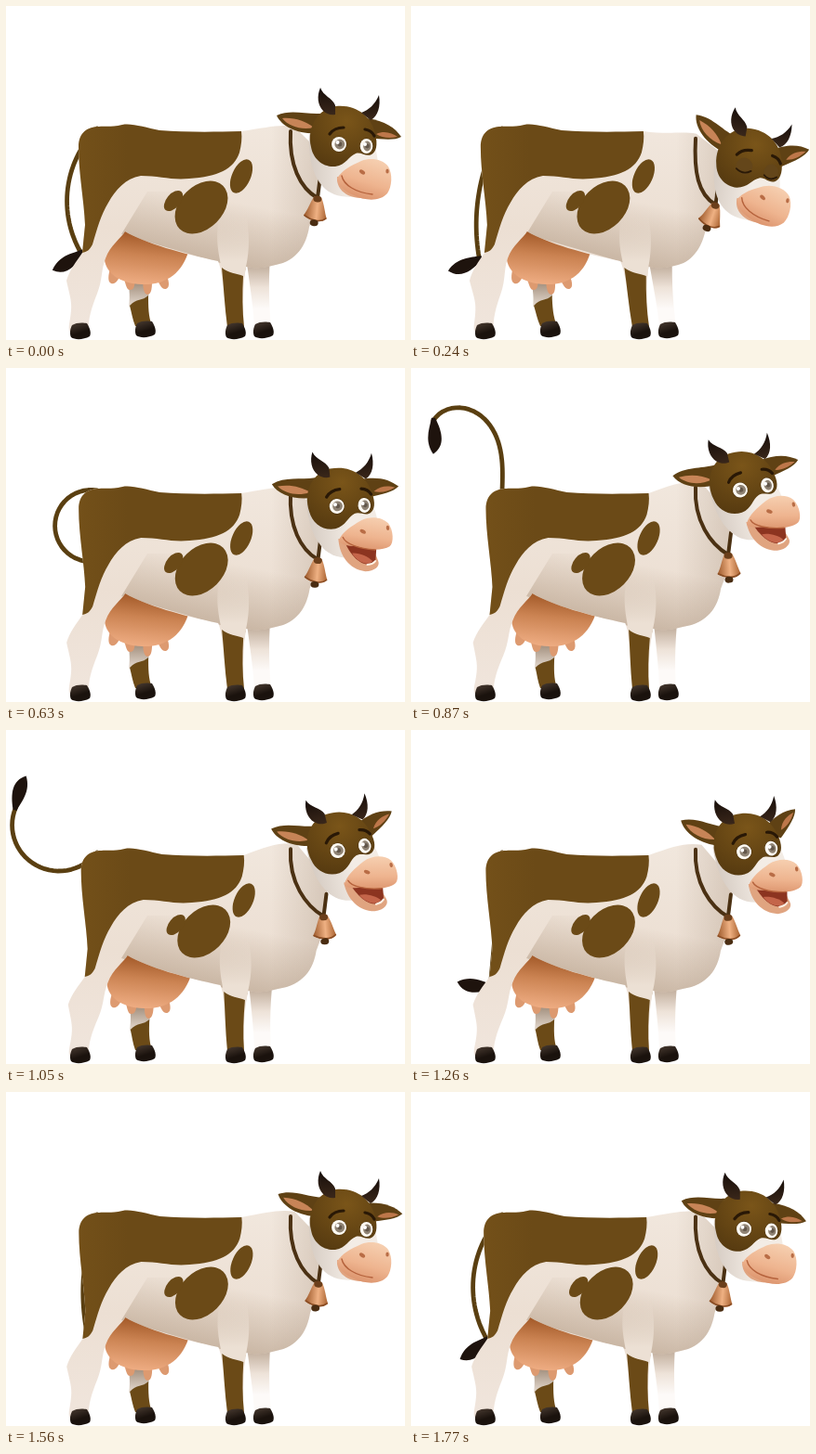
These frames come from a looping animation (429x360 px, 1800 ms). An HTML page:

```html
<!DOCTYPE html>
<html lang="en">
<head>
<meta charset="utf-8">
<title>Cow</title>
<style>
html, body { margin: 0; width: 100%; height: 100%; overflow: hidden; background: #fff; }
svg { display: block; width: 100vw; height: 100vh; }
.brown { fill: #6b4a17; }
.dark { fill: #1e130d; }
.line { fill: none; stroke-linecap: round; stroke-linejoin: round; }
</style>
</head>
<body>
<svg viewBox="0 0 429 360">
  <defs>
    <linearGradient id="coat" x1="0" y1="0" x2="0" y2="1">
      <stop offset="0" stop-color="#f1e7dd"/><stop offset=".5" stop-color="#ecdfd3"/><stop offset="1" stop-color="#f0e5dc"/>
    </linearGradient>
    <linearGradient id="belly" gradientUnits="userSpaceOnUse" x1="215" y1="205" x2="200" y2="278">
      <stop offset="0" stop-color="#a48a70" stop-opacity="0"/><stop offset="1" stop-color="#a48a70" stop-opacity=".55"/>
    </linearGradient>
    <linearGradient id="throat" gradientUnits="userSpaceOnUse" x1="285" y1="0" x2="338" y2="0">
      <stop offset="0" stop-color="#a08a75" stop-opacity="0"/><stop offset="1" stop-color="#a08a75" stop-opacity=".28"/>
    </linearGradient>
    <linearGradient id="foreleg" gradientUnits="userSpaceOnUse" x1="0" y1="225" x2="0" y2="275">
      <stop offset="0" stop-color="#ece0d4" stop-opacity="0"/><stop offset="1" stop-color="#ece0d4"/>
    </linearGradient>
    <linearGradient id="farleg" x1="0" y1="0" x2="0" y2="1">
      <stop offset="0" stop-color="#b09a86"/><stop offset=".45" stop-color="#eee3d9"/><stop offset=".75" stop-color="#fdfaf8"/>
    </linearGradient>
    <linearGradient id="farthigh" x1="0" y1="0" x2="0" y2="1">
      <stop offset=".2" stop-color="#9a8673"/><stop offset="1" stop-color="#e6dbd1"/>
    </linearGradient>
    <linearGradient id="udder" x1=".6" y1="0" x2=".45" y2="1">
      <stop offset=".15" stop-color="#a55c2b"/><stop offset=".5" stop-color="#cb8352"/><stop offset="1" stop-color="#eeac82"/>
    </linearGradient>
    <linearGradient id="hide" x1="0" y1="0" x2="1" y2="0">
      <stop offset="0" stop-color="#735019"/><stop offset=".3" stop-color="#6b4a17"/>
    </linearGradient>
    <linearGradient id="horn" x1="0" y1="0" x2="0" y2="1">
      <stop offset="0" stop-color="#170e0a"/><stop offset="1" stop-color="#3a271a"/>
    </linearGradient>
    <linearGradient id="nail" x1="0" y1="0" x2=".4" y2="1">
      <stop offset="0" stop-color="#4b3d33"/><stop offset=".7" stop-color="#1a120d"/>
    </linearGradient>
    <radialGradient id="skull" cx=".55" cy=".25" r=".8">
      <stop offset="0" stop-color="#7a5519"/><stop offset="1" stop-color="#563a10"/>
    </radialGradient>
    <linearGradient id="face" x1="0" y1="0" x2="1" y2="0">
      <stop offset="0" stop-color="#d6ccc3"/><stop offset=".6" stop-color="#f3ece5"/>
    </linearGradient>
    <linearGradient id="nose" x1=".7" y1="0" x2=".3" y2="1">
      <stop offset="0" stop-color="#f6cfb0"/><stop offset=".55" stop-color="#eeb48f"/><stop offset="1" stop-color="#d98f68"/>
    </linearGradient>
    <linearGradient id="brass" x1="0" y1="0" x2="1" y2="0">
      <stop offset="0" stop-color="#9a5729"/><stop offset=".55" stop-color="#efb183"/><stop offset="1" stop-color="#a8612f"/>
    </linearGradient>
    <clipPath id="inside"><path class="torso"/></clipPath>
    <path id="hoof" fill="url(#nail)" d="M1,2 C5,-1 13,-1 17,0 C20,5 22,10 20,14 C13,18 4,18 0,15 C-2,11 -1,6 1,2Z"/>
  </defs>

  <path id="tail" class="line" stroke="#5a3f11" stroke-width="4.8"/>
  <path id="tuft" class="dark"/>

  <path class="bend" fill="url(#farleg)" d="M258,270 L284,270 C282,300 283,325 285,345 L267,345 C266,325 262,300 258,270Z"/>
  <path class="bend" fill="url(#farthigh)" d="M130,288 L158,288 C156,298 154,306 153,314 L132,324 C134,312 132,300 130,288Z"/>
  <path class="bend brown" d="M133,323 C140,315 147,318 153,312 C153,324 153,334 157,345 L139,345 C136,338 135,330 133,323Z"/>
  <use href="#hoof" x="140" y="340"/>
  <use href="#hoof" x="267" y="341"/>

  <g fill="#dd9a70">
    <path class="bend" d="M112,283 C110,290 109,297 113,299 C118,301 121,294 124,288Z"/>
    <path class="bend" d="M127,294 C129,301 130,307 134,306 C139,305 138,299 139,294Z"/>
    <path class="bend" d="M147,294 C147,302 148,311 152,311 C157,311 157,302 157,294Z"/>
    <path class="bend" d="M161,292 C165,299 167,306 172,305 C177,303 175,296 172,288Z"/>
  </g>
  <path class="bend" fill="url(#udder)" d="M128,238 C115,250 105,262 106,274 C108,288 122,299 146,300 C172,301 190,288 197,262Z"/>

  <path class="torso" fill="url(#coat)"/>
  <g clip-path="url(#inside)">
    <path fill="url(#belly)" d="M152,200 L340,200 L340,285 L258,285 L124,246Z"/>
    <path fill="url(#throat)" d="M285,120 H345 V285 H285Z"/>
  </g>
  <path class="bend" fill="url(#foreleg)" d="M230,225 C224,250 229,268 232,284 L234,300 L255,300 L258,281 C262,262 262,245 258,225Z"/>
  <path class="bend" fill="url(#hide)" d="M125,128 C112,131 105,129 100,130 C88,130 78,136 78,152 C78,180 84,210 85,236 L82,266 C87,265 90,263 93,257 C98,240 102,225 110,212 C118,198 128,186 145,183 C165,183 178,188 197,186 C228,184 245,176 251,158 C253,150 254,142 253,135 C220,136 190,136 165,134 C150,131 135,126 125,128Z"/>
  <g id="spots" class="brown">
    <ellipse rx="33" ry="23" transform="translate(210 217) rotate(-45)"/>
    <ellipse rx="13" ry="7.5" transform="translate(180 210) rotate(-50)"/>
    <ellipse rx="19.5" ry="10" transform="translate(253 183.5) rotate(-66)"/>
  </g>
  <path class="bend brown" d="M232,282 C239,288 248,288 255,291 C254,310 254,328 256,346 L238,346 C235,324 234,302 232,282Z"/>
  <use href="#hoof" x="70" y="342"/>
  <use href="#hoof" x="237" y="342"/>

  <path id="strap" class="line" stroke="#4b3113" stroke-width="4"/>
  <g id="bell">
    <path fill="url(#brass)" d="M-4,-1 C-8,7 -9,14 -13,20 C-5,26 7,27 12,21 C9,14 8,6 4,-1Z"/>
    <path class="line" stroke="#8a4d24" stroke-width="1.6" d="M-12,20 C-4,25 6,26 11,21"/>
    <ellipse cx="-1" cy="27" rx="4.5" ry="3.4" fill="#4a2d12"/>
    <ellipse cy="1" rx="4.5" ry="3.5" fill="#6b3f1b"/>
  </g>

  <g id="head">
    <g id="earL">
      <path fill="#5f4114" d="M338,116 C322,117 306,111 291,118 C297,131 316,139 338,137Z"/>
      <path fill="#c78457" d="M297,121 C310,120 322,124 331,131 C318,134 304,130 297,121Z"/>
    </g>
    <g id="earR">
      <path fill="#5f4114" d="M388,121 C408,124 418,131 425,141 C418,145 406,144 390,142Z"/>
      <path fill="#bd774a" d="M398,138 C407,134 415,137 421,141 C412,143 404,142 398,138Z"/>
    </g>
    <path fill="url(#face)" d="M326,138 C325,162 329,184 343,197 C351,204 361,206 374,206 L400,175 C400,150 390,130 370,122Z"/>
    <path id="jaw" fill="#e0a480"/>
    <path id="mouth" fill="#8c3420"/>
    <path id="tongue" fill="#c4654a"/>
    <path id="teeth" class="line" stroke="#fff3e6" stroke-width="2"/>
    <path id="muzzle" fill="url(#nose)"/>
    <path id="smile" class="line" stroke="#b5623c" stroke-width="1.4"/>
    <ellipse rx="3.4" ry="2" transform="translate(383 179) rotate(35)" fill="#b96d46"/>
    <ellipse cx="410" cy="178" rx="1.7" ry="2.6" fill="#b96d46"/>
    <path fill="url(#skull)" d="M328,152 C323,130 336,110 355,108 C377,106 393,119 397,138 C400,150 398,157 393,160 C387,163 382,157 376,159 C368,162 366,171 354,173 C340,174 330,164 328,152Z"/>
    <path fill="url(#horn)" d="M338,88 C341,97 351,99 354,107 L354,117 C349,118 344,116 341,113 C335,107 334,97 338,88Z"/>
    <path fill="url(#horn)" d="M401,96 C403,108 400,119 392,123 L382,115 C390,112 397,106 401,96Z"/>
    <g id="eyes"></g>
    <path class="line" stroke="#291806" stroke-width="3.2" d="M348,138 Q353,131 363,131 M386,133 Q393,134 396,140"/>
  </g>
</svg>
<script>
const LOOP = 1800, STEP = 30;
const $ = id => document.getElementById(id);
const set = (id, d) => $(id).setAttribute('d', d);
const move = (id, value) => $(id).setAttribute('transform', value);

// time, height, tilt
const nod = [
  [0, 150, 0], [240, 176, 9.5], [330, 177, 8.5], [630, 148.5, -6],
  [870, 129, -14], [1060, 127.5, -14], [1260, 129.5, -11], [1560, 147, 0]
];
// time, angle at the root, bend, extra bend at the end, angle of the tuft (0 hangs, 90 points left)
const swish = [
  [0, 45, -75, 0, 58], [240, 30, -40, 0, 68], [430, 30, -70, 0, -40],
  [630, 100, -215, 0, -90], [870, 182, 0, -150, 0], [1000, 85, 100, 0, 185],
  [1110, -5, 190, 0, 180], [1260, 5, 0, 0, 98], [1500, 15, -25, 0, 0]
];

const ramp = (t, from, to) => {
  const u = Math.max(0, Math.min(1, (t - from) / (to - from)));
  return u * u * (3 - 2 * u);
};
const bump = (t, mid, half) => 1 - ramp(Math.abs(t - mid), 0, half);

// Smooth cyclic interpolation through the rows.
function sample(rows, t) {
  const n = rows.length;
  const row = k => rows[(k + n) % n];
  const time = k => row(k)[0] + LOOP * Math.floor(k / n);
  let i = n - 1;
  while (rows[i][0] > t) i--;
  const span = time(i + 1) - time(i), u = (t - time(i)) / span;
  return row(i).slice(1).map((a, j) => {
    const v = k => row(k)[j + 1], b = v(i + 1);
    const slope = k => (v(k + 1) - v(k - 1)) / (time(k + 1) - time(k - 1)) * span;
    const m0 = slope(i), m1 = slope(i + 1);
    return a + u * (m0 + u * (3 * (b - a) - 2 * m0 - m1 + u * (2 * (a - b) + m0 + m1)));
  });
}

// Sways a path sideways while the hooves stay planted.
const bend = (d, sway) => d.replace(/([\d.]+),([\d.]+)/g, (m, x, y) =>
  (+x + sway * Math.max(0, Math.min(1, (345 - y) / 75))).toFixed(2) + ',' + y);

const bent = [...document.querySelectorAll('.bend')].map(el => [el, el.getAttribute('d')]);
const torso = document.querySelectorAll('.torso');

// The body follows the head: it leans back as the head drops.
function drawBody(headY) {
  const sway = (150 - headY) * .12, chest = sway * 1.8, nape = 128 + (headY - 150) * .3;
  for (const [el, d] of bent) el.setAttribute('d', bend(d, sway));
  move('spots', `translate(${sway} 0)`);
  const d = `M100,130 C88,130 78,136 78,152 C78,180 84,210 85,236 L82,266 C76,275 68,285 65,296
    C68,310 71,318 70,328 C69,340 67,344 68,350 L89,350 C88,338 92,325 98,310 C104,295 102,285 107,272
    C112,258 124,250 128,243 C150,256 190,267 228,275 C232,285 234,300 238,345 L256,345
    C254,320 255,300 258,281 C268,283 275,283 290,279 C${312 + chest},275 ${323 + chest},258 ${326 + chest},238
    C${331 + chest},225 ${335 + chest},215 ${335 + chest},205 L345,165 L310,${nape + 2}
    C295,${nape - 1} 280,${nape + 3} 253,135 C220,136 190,136 165,134 C150,131 135,126 125,128
    C112,131 105,129 100,130Z`;
  for (const el of torso) el.setAttribute('d', bend(d, sway));

  const x = 335 + sway * 2.4, y = 207 - sway * 2.3, top = nape + 7;
  set('strap', `M306,${top} C304,${top + 36} ${x - 19},${y - 11} ${x},${y} L${x + 3},${y - 24}`);
  move('bell', `translate(${x} ${y}) rotate(${6 - sway * 4})`);
}

function drawTail(t) {
  const [root, curve, curl, tuft] = sample(swish, t);
  const N = 30, LENGTH = 145, TUFT = 36;
  const heading = deg => [-Math.sin(deg * Math.PI / 180), Math.cos(deg * Math.PI / 180)];
  let x = 98, y = 132, d = `M${x},${y}`;
  for (let i = 0; i < N; i++) {
    const s = (i + .5) / N, [dx, dy] = heading(root + curve * s + curl * s * s);
    x += dx * LENGTH / N;
    y += dy * LENGTH / N;
    d += `L${x},${y}`;
  }
  set('tail', d);
  const [dx, dy] = heading(tuft);
  const at = (f, w) => [x + dx * f * TUFT - dy * w, y + dy * f * TUFT + dx * w];
  set('tuft', `M${at(-.08, 2)} C${at(.25, 4)} ${at(.6, 10)} ${at(1, 0)} C${at(.75, -13)} ${at(.35, -10)} ${at(-.08, -2)}Z`);
}

function drawHead(t, y, tilt) {
  const perk = 22 * Math.max(bump(t, 240, 240), bump(t, 1260, 480));
  const o = ramp(t, 440, 600) - ramp(t, 1230, 1530);
  const blink = ramp(t, 90, 180) - ramp(t, 360, 450);
  move('head', `translate(${-4.5 * bump(t, 820, 380)} ${y - 150}) rotate(${tilt} 372.5 150)`);
  move('earL', `rotate(${perk} 333 128)`);
  move('earR', `rotate(${-1.8 * perk - 12 * o} 395 132)`);

  set('jaw', `M356,184 C355,${196 + 6 * o} 364,${206 + 12 * o} 381,${207 + 15 * o}
    C391,${208 + 15 * o} 398,${206 + 12 * o} ${398 - 2 * o},${200 + 12 * o} L390,190Z`);
  set('mouth', `M361,184 L396,196 L${394 - o},${199 + 14 * o}
    C${386 - 2 * o},${202 + 17 * o} ${370 - o},${198 + 14 * o} 361,184Z`);
  set('tongue', `M${370 - o},${195 + 6 * o} C376,${196 + 5 * o} 386,${197 + 9 * o} 390,${198 + 14 * o}
    C384,${199 + 18 * o} 373,${197 + 14 * o} ${370 - o},${195 + 6 * o}Z`);
  set('teeth', `M384,${199 + 16 * o} Q390,${200 + 15 * o} 393,${199 + 13 * o}`);
  $('teeth').style.opacity = o;
  set('muzzle', `M356,186 C361,177 371,172 382,167 C392,163 405,165 411,173 C416,181 415,195 410,${202 - 4 * o}
    C402,${211 - 9 * o} 386,${210 - 10 * o} 374,${204 - 10 * o} C365,${200 - 7 * o} 357,${194 - 4 * o} 356,186Z`);
  set('smile', `M361,183 C363,${193 - 3 * o} 376,${201 - 4 * o} 394,${203 - 3 * o}`);

  for (const { ball, lid, cy } of eyes) {
    ball.setAttribute('transform', `translate(0 ${cy * blink}) scale(1 ${1 - blink})`);
    lid.style.opacity = blink;
  }
}

function addEye(x, y, r) {
  const g = document.createElementNS('http://www.w3.org/2000/svg', 'g');
  g.innerHTML = `<g>
    <ellipse cx="${x}" cy="${y}" rx="${r + .5}" ry="8.6" fill="#4a3210"/>
    <ellipse cx="${x}" cy="${y}" rx="${r}" ry="8" fill="#fffaf2"/>
    <ellipse cx="${x + .8}" cy="${y}" rx="${r - 2.6}" ry="5.4" fill="#8f8374"/>
    <circle cx="${x + 1}" cy="${y}" r="2.4" fill="#63574a"/>
    <circle cx="${x - 1.5}" cy="${y - 2}" r="2" fill="#fff"/>
  </g><g>
    <ellipse cx="${x}" cy="${y}" rx="${r + 1}" ry="9" fill="#64461a"/>
    <path class="line" stroke="#2a1907" stroke-width="1.8" d="M${x - r},${y + 4} Q${x},${y + 10} ${x + r},${y + 4}"/>
  </g>`;
  $('eyes').append(g);
  const [ball, lid] = g.children;
  return { ball, lid, cy: y };
}
const eyes = [addEye(358, 149, 8), addEye(387.5, 151, 6.8)];

function frame() {
  const t = Math.floor(performance.now() % LOOP / STEP) * STEP;
  const [y, tilt] = sample(nod, t);
  drawBody(y);
  drawTail(t);
  drawHead(t, y, tilt);
  requestAnimationFrame(frame);
}
frame();
</script>
</body>
</html>
```
